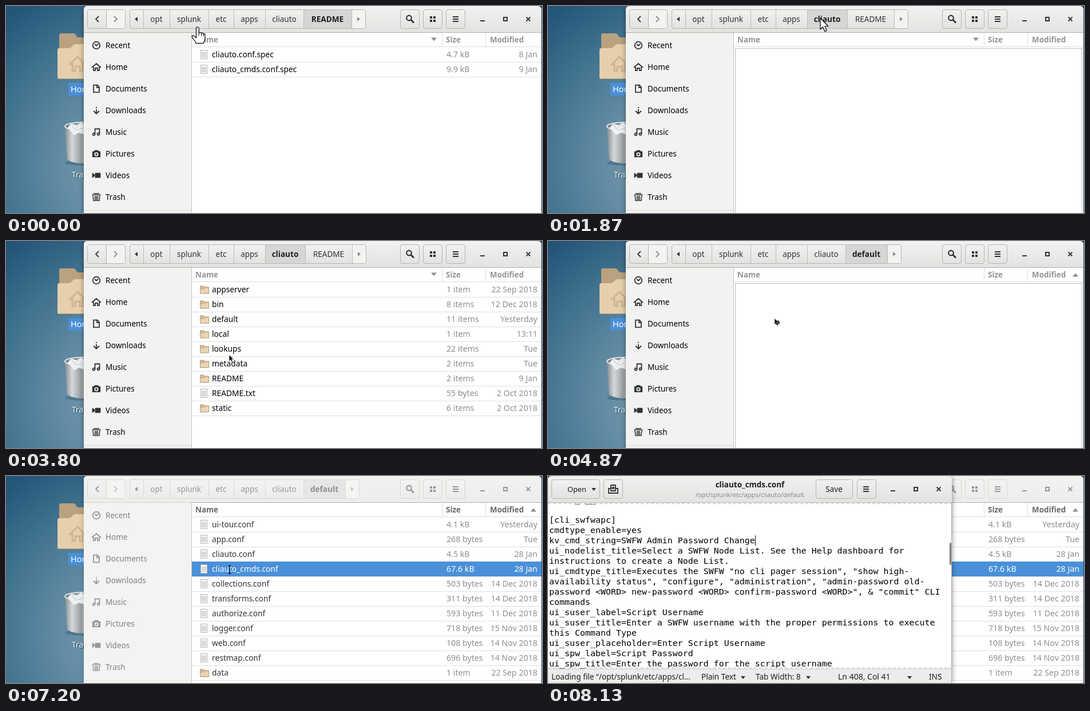
An HTML page that plays this animation: 937x363 px, repeating every 8270 ms.

```html
<!DOCTYPE html>
<html lang="en">
<head>
<meta charset="utf-8">
<title>File browser</title>
<style>
html, body { margin: 0; width: 100%; height: 100%; overflow: hidden; background: #40708f; }
svg { display: block; width: 937px; height: 363px; }
text { font: 13.6px "Noto Sans", "Open Sans", sans-serif; fill: #1c2022; white-space: pre; }
.b { font-weight: bold; }
.mid { text-anchor: middle; }
.end { text-anchor: end; }
.meta { font-size: 14.2px; fill: #8b8e8f; }
.side { font-size: 13.5px; fill: #000; }
.head { font-weight: bold; font-size: 13.4px; fill: #929595; }
.name { fill: inherit; }
.sel, .sel text { fill: #fff; }
.code { font: 14.95px "DejaVu Sans Mono", monospace; fill: #000; }
.ico { fill: none; stroke: #2e3436; stroke-width: 1.8; }
.solid { fill: #2e3436; }
</style>
</head>
<body>
<svg id="stage" viewBox="0 0 937 363" xmlns="http://www.w3.org/2000/svg"></svg>
<script>
const stage = document.getElementById('stage');
const LOOP = 8270;

// ---------- markup helpers ----------
const rect = (x, y, w, h, fill, more = '') =>
  `<rect x="${x}" y="${y}" width="${w}" height="${h}" fill="${fill}" ${more}/>`;
const path = (d, more = '') => `<path d="${d}" ${more}/>`;
const text = (x, y, s, cls = '', more = '') =>
  `<text x="${x}" y="${y}" class="${cls}" ${more}>${s.replace(/&/g, '&amp;').replace(/</g, '&lt;')}</text>`;
const group = (id, body, more = '') => `<g id="${id}" ${more}>${body}</g>`;
const at = (x, y, body, more = '') => `<g transform="translate(${x} ${y})" ${more}>${body}</g>`;
const hline = (x1, x2, y, c) => rect(x1, y, x2 - x1, 1, c);
const vline = (x, y1, y2, c) => rect(x, y1, 1, y2 - y1, c);
const tri = (x, y, dir, r = 4, c = '#2e3436') => {
  const turn = { right: 0, down: 90, left: 180, up: 270 }[dir];
  return path(`M${-r / 2} ${-r}L${r / 2 + 1} 0L${-r / 2} ${r}z`,
    `transform="translate(${x} ${y}) rotate(${turn})" fill="${c}"`);
};
const button = (x, w) =>
  rect(x + .5, 6.5, w, 33, 'url(#btn)', 'rx="3.5" stroke="#b4b4b0"');

// ---------- shared window parts ----------
const burger = x => [-4, 0, 4].map(d => rect(x - 5, 22 + d, 10, 2, '#2e3436')).join('');
const controls = x =>
  rect(x - 4, 25, 8, 2, '#2e3436') +
  rect(x + 37, 20, 6, 6, 'none', 'stroke="#2e3436" stroke-width="2"') +
  path(`M${x + 76.5} 19.5l7 7m0-7l-7 7`, 'class="ico"');
const frame = (x, w) =>
  path(`M${x} 363V7q0-7 7-7H${x + w - 7}q7 0 7 7V363z`, 'fill="#f2f2f1"') +
  path(`M${x} 46V7q0-7 7-7H${x + w - 7}q7 0 7 7V46z`, 'fill="url(#bar)"') +
  hline(x, x + w, 46, '#b0b0ac');

// ---------- desktop ----------
function desktop() {
  const home =
    path('M93 51q0-3 3-3h22q3 0 4 3l3 4h30v60H93z', 'fill="#b9a27f"') +
    path('M90 77q0-3 3-3h17q3 0 5-3l2-2q2-2 5-2h40v61H93q-3 0-3-3z', 'fill="#e6cfac"') +
    hline(91, 160, 127, '#c4aa82') +
    path('M112 102l13-13 13 13h-4v12h-5v-8h-8v8h-5v-12z',
      'fill="none" stroke="#cbb58f" stroke-width="3"');
  const bin =
    '<ellipse cx="134" cy="275" rx="31" ry="5" fill="#24485f" opacity=".35"/>' +
    path('M103 211l4 58q8 7 27 7t27-7l4-58z', 'fill="url(#metal)"') +
    path('M103 211l4 58q8 7 27 7t27-7l4-58z', 'fill="url(#mesh)"') +
    '<ellipse cx="134" cy="211" rx="31" ry="7" fill="#7c8386" stroke="#dfe3e4" stroke-width="2"/>' +
    path('M108 213l6-7 9 3 8-5 10 6 8 6-10 10-12-4-8 5z', 'fill="#edf1f3"') +
    path('M114 207l6 9 10-11m-8 13l13-4', 'stroke="#b9c4ca" fill="none"');
  return rect(0, 0, 937, 363, 'url(#sky)') + home +
    rect(109, 135, 54, 22, '#4a90d9', 'rx="2"') +
    text(113, 151, 'Home', '', 'style="fill:#fff;font-size:14.5px"') + bin +
    text(116, 302, 'Trash', '', 'style="fill:#17384e;font-size:14px"') +
    text(115, 301, 'Trash', '', 'style="fill:#fff;font-size:14px"');
}

// ---------- file browser ----------
function sidebar() {
  const icons = {
    Recent: '<circle r="6.3"/>' + path('M-3-2l3 2.5 3.5-3'),
    Home: path('M-8 1L0-6 8 1M-5 0V6h3V2h4v4h3V0'),
    Documents: path('M-5-6.3H2L5-3V6.3H-5zM1-6V-2H5'),
    Downloads: path('M-5 1L0 6 5 1M0 5V-2M0-4v-2'),
    Music: '<circle cx="-4.5" cy="4" r="2"/><circle cx="3.5" cy="3.5" r="2"/>' + path('M-2.5 4V-5.5h8V3.5'),
    Pictures: path('M-7-4h3l1-2h6l1 2h3V6H-7z', 'class="solid" stroke-width=".3"') +
      '<circle cy="1" r="2.7" style="stroke:#f2f2f1"/>',
    Videos: path('M-2-4H7V4H-2zM-7-4l4 3v2l-4 3z', 'class="solid" stroke-width=".8"'),
    Trash: path('M-7.500-4H7.500M-5-6.300H5M-6-3l1 9.300H5l1-9.300M-2-2q-1 4 0 7M2-2q1 4 0 7M0-2v7', 'stroke-width="1.500"')
  };
  return Object.entries(icons).map(([label, art], i) => {
    const y = 69 + 38 * i;
    return at(158, y, art, 'class="ico"') + text(174, y + 4.5, label, 'side');
  }).join('') + hline(136, 324, 358, '#d5d5d3') + vline(324, 47, 363, '#c3c3c0');
}

function crumbs(id, labels, edges, active) {
  const last = edges[edges.length - 1], end = last + 24;
  let s = rect(216.5, 6.5, end - 216, 33, 'url(#btn)', 'rx="3.5" stroke="#b4b4b0"') +
    rect(last + 1, 7, 23, 32, '#f3f3f2', 'rx="3"') +
    tri(228, 23, 'left') + tri(end - 12, 23, 'right', 4, '#8b8e8f');
  labels.forEach((label, i) => {
    const x = edges[i], w = edges[i + 1] - x, on = i === active;
    if (on) s += rect(x, 7, w, 32, '#d6d6d4');
    s += text(x + w / 2, 28, label, on ? 'mid b' : 'mid', on ? '' : 'style="font-size:13.5px;fill:#2e3436"');
  });
  s += edges.map(x => vline(x, 7, 39, '#bcbcb9')).join('');
  return group(id, s);
}

function toolbar() {
  const base = ['opt', 'splunk', 'etc', 'apps', 'cliauto'];
  const x = [240, 286, 354, 398, 453];
  return button(142, 66) + rect(176, 7, 32, 32, '#f3f3f2', 'rx="3"') + vline(175, 7, 39, '#b4b4b0') +
    path('M162 18l-5 5 5 5', 'class="ico" stroke-width="2"') +
    path('M189 18l5 5-5 5', 'class="ico" style="stroke:#8b8e8f"') +
    crumbs('path0', [...base, 'README'], [...x, 520, 604], 5) +
    crumbs('path1', [...base, 'README'], [...x, 523, 605], 4) +
    crumbs('path2', [...base, 'default'], [...x, 520, 593], 5) +
    button(689, 33) + button(729, 33) + button(769, 33) +
    '<circle cx="704.5" cy="21" r="4.300" class="ico" style="stroke-width:2.200"/>' +
    path('M707.5 24l5.500 5.500', 'class="ico" style="stroke-width:3"') +
    [0, 6].map(a => [0, 6].map(b => rect(741 + a, 18 + b, 4, 4, '#2e3436')).join('')).join('') +
    burger(786) + controls(833);
}

const page = rect(340.5, -7.5, 11, 15, '#fafafa', 'stroke="#b5b5b2"') +
  [-4, -2, 0, 2, 4].map(y => rect(342, y, 8, 1, '#b9b9b6')).join('');
const folder = path('M339.5-6h6l2 2h7V7h-15z', 'fill="#d2ba94" stroke="#b59d77"') +
  path('M340 6V0h6l2-2h6V6z', 'fill="#ead6b5"');

function listing(id, lines, pick) {
  return group(id, lines.trim().split('\n').map((line, i) => {
    const [name, size, date] = line.split('|');
    const y = 85 + 26 * i;
    const row = sel => (sel ? rect(325, y - 13, 611, 26, '#4a90d9') : hline(325, 936, y + 13, '#dfdfdd')) +
      at(0, y, /item/.test(size) ? folder : page) +
      text(360, y + 5, name, 'name', 'style="font-size:13.75px"') +
      text(770, y + 5, size, 'meta') + text(929, y + 5, date, 'meta end');
    return row(false) + (i === pick ? group(id + 'Sel', row(true), 'class="sel"') : '');
  }).join(''));
}

function files() {
  return rect(325, 47, 611, 316, '#fff') +
    group('heads', text(331, 64, 'Name', 'head', 'id="headName"') +
      text(769, 64, 'Size', 'head') + text(846, 64, 'Modified', 'head')) +
    group('sortName', tri(748, 58, 'down', 5, '#8b8e8f')) +
    group('sortDate', tri(922, 60, 'up', 5, '#8b8e8f')) +
    vline(762, 47, 72, '#dcdcda') + vline(838, 47, 72, '#dcdcda') + hline(325, 936, 71, '#dcdcda') +
    group('empty', rect(327.5, 74.5, 606, 300, 'none', 'stroke="#777" stroke-dasharray="1 1"')) +
    listing('list0', `
cliauto.conf.spec|4.7 kB|8 Jan
cliauto_cmds.conf.spec|9.9 kB|9 Jan`) +
    listing('list1', `
appserver|1 item|22 Sep 2018
bin|8 items|12 Dec 2018
default|11 items|Yesterday
local|1 item|13:11
lookups|22 items|Tue
metadata|2 items|Tue
README|2 items|9 Jan
README.txt|55 bytes|2 Oct 2018
static|6 items|2 Oct 2018`, 2) +
    listing('list2', `
ui-tour.conf|4.1 kB|Yesterday
app.conf|268 bytes|Tue
cliauto.conf|4.5 kB|28 Jan
cliauto_cmds.conf|67.6 kB|28 Jan
collections.conf|503 bytes|14 Dec 2018
transforms.conf|311 bytes|14 Dec 2018
authorize.conf|593 bytes|11 Dec 2018
logger.conf|718 bytes|15 Nov 2018
web.conf|108 bytes|14 Nov 2018
restmap.conf|696 bytes|14 Nov 2018
data|1 item|22 Sep 2018`, 3);
}

// ---------- text editor ----------
function editor() {
  const lines = `     _ __

[cli_swfwapc]
cmdtype_enable=yes
kv_cmd_string=SWFW Admin Password Change
ui_nodelist_title=Select a SWFW Node List. See the Help dashboard for
instructions to create a Node List.
ui_cmdtype_title=Executes the SWFW "no cli pager session", "show high-
availability status", "configure", "administration", "admin-password old-
password <WORD> new-password <WORD> confirm-password <WORD>", & "commit" CLI
commands
ui_suser_label=Script Username
ui_suser_title=Enter a SWFW username with the proper permissions to execute
this Command Type
ui_suser_placeholder=Enter Script Username
ui_spw_label=Script Password
ui_spw_title=Enter the password for the script username`.split('\n');
  const dash = y => path(`M0 ${y}H706`, 'stroke="#b8b8b5" stroke-dasharray="5 4"');
  const doc = lines.map((s, i) => text(2, 46 + 18 * i, s, 'code')).join('');
  return rect(0, 2, 706, 361, '#000', 'filter="url(#blur)" opacity=".45"') + frame(0, 706) +
    button(6, 84) + text(34, 28, 'Open', '', 'style="font-size:12.8px"') + tri(80, 23, 'down') +
    button(97, 33) +
    path('M109 22h-3v8h16v-8h-3M110 16h8v10h-8zM114 18v6m-3-3h6', 'class="ico"') +
    text(353, 20, 'cliauto_cmds.conf', 'mid b', 'style="font-size:13.5px"') +
    text(353, 37, '/opt/splunk/etc/apps/cliauto/default', 'mid', 'style="font-size:11.15px;fill:#858889"') +
    button(468, 64) + text(500, 28, 'Save', 'mid') + button(540, 33) + burger(556) + controls(603) +
    rect(0, 47, 706, 291, '#fff') +
    group('doc', doc + dash(48.5) + dash(336.5) +
      rect(702, 117, 3, 39, '#7d8081', 'rx="1.5"'), 'clip-path="url(#page)"') +
    rect(0, 338, 706, 25, '#ececeb') + hline(0, 706, 338, '#c9c9c6') +
    text(6, 357, 'Loading file “/opt/splunk/etc/apps/cl…') +
    text(268, 357, 'Plain Text') + tri(341, 353, 'down') +
    text(363, 357, 'Tab Width: 8') + tri(455, 353, 'down') +
    text(507, 357, 'Ln 408, Col 41', '', 'style="font-size:14px"') + tri(632, 353, 'down') +
    text(666, 357, 'INS') + group('caret', vline(362, 104, 122, '#000')) +
    vline(705, 47, 363, '#b5b5b2');
}

// ---------- pointers ----------
const arrow = path('M0-.5V11l2.6-2.4 1.9 4 1.9-.9-1.9-3.9h3.7z', 'fill="#000" stroke="#fff" stroke-width=".7"');
const white = 'fill="#fff" stroke="#000" stroke-width="1.2" stroke-linejoin="round"';
const pointers =
  group('hand', path('M-2.5 2q0-2 2.3-2T2.2 2v8q3-1.5 4.3.8 3-1 4 1 2.5-.6 2.5 2v6q0 4-3 8.5H-3q-1-4-5-8-3-4-1-5.3 2-1 4 1.3l2.5 2.5z', white) +
    path('M2.2 10v5m4.3-4v4.5m4-3.5v4', 'stroke="#000"')) +
  group('arrow', arrow) +
  group('wait', arrow + '<circle cx="5.5" cy="7" r="2.6" fill="#777" stroke="#000" stroke-width="2" stroke-dasharray="3 1" id="ring"/>') +
  group('big', path('M0 0v20l4.5-4.3 3.5 8 3.2-1.4-3.4-7.8h6z', white)) +
  group('beam', path('M-2-7q2 0 2 1.5V5.5Q0 7-2 7M2-7Q0-7 0-5.5M0 5.5Q0 7 2 7', 'fill="none" stroke="#000" stroke-width="1.3"'));

const stops = (...list) => list.map(([o, c]) => `<stop offset="${o}" stop-color="${c}"/>`).join('');
const fade = (id, a, b) => `<linearGradient id="${id}" x2="0" y2="1">${stops([0, a], [1, b])}</linearGradient>`;

stage.innerHTML = `<defs>
  <radialGradient id="sky" gradientUnits="userSpaceOnUse" cx="230" cy="280" r="370">
    ${stops([0, '#7b9dae'], [.35, '#648da5'], [.65, '#42738f'], [1, '#1e4f75'])}</radialGradient>
  ${fade('bar', '#f1f1f0', '#e3e3e1')}${fade('btn', '#f1f1f0', '#e2e2e0')}
  <linearGradient id="metal">${stops([0, '#8b9194'], [.2, '#e4e7e8'], [.45, '#a3a9ab'], [.7, '#e2e5e6'], [1, '#6d7376'])}</linearGradient>
  <pattern id="mesh" width="4" height="4" patternUnits="userSpaceOnUse">${path('M0 0l4 4M4 0L0 4', 'stroke="#4f5558" stroke-width=".6" opacity=".35"')}</pattern>
  <filter id="blur" x="-10%" y="-20%" width="120%" height="140%"><feGaussianBlur stdDeviation="5"/></filter>
  <clipPath id="page"><rect y="47" width="706" height="291"/></clipPath></defs>` +
  desktop() + group('shade', rect(136, 3, 800, 365, '#000', 'filter="url(#blur)"')) +
  frame(136, 800) + toolbar() + sidebar() +
  group('dim', path('M136 363V7q0-7 7-7H929q7 0 7 7V46H324V363z', 'fill="#f5f5f4"')) +
  group('files', files()) + group('editor', editor()) + group('pointer', pointers);

// ---------- motion ----------
const el = {};
stage.querySelectorAll('[id]').forEach(n => el[n.id] = n);
const show = (id, on) => el[id].setAttribute('display', on ? 'inline' : 'none');
const ramp = (t, a, b) => Math.min(1, Math.max(0, (t - a) / (b - a)));
const ease = p => p * p * (3 - 2 * p);

// time, x, y
const route = [
  [0, 335, 37], [470, 480, 18], [600, 467, 12], [1070, 467, 12], [1130, 470, 14], [1200, 470, 14],
  [1400, 476, 21], [2270, 476, 21], [2730, 390, 216], [2800, 390, 217], [3200, 390, 233],
  [3330, 390, 233], [3800, 390, 200], [4130, 399, 162], [4270, 399, 162], [4600, 396, 136],
  [5270, 396, 136], [5600, 394, 168], [6940, 394, 168], [7000, 391, 164], [LOOP, 391, 164]
];

function spot(t) {
  const i = Math.max(1, route.findIndex(k => k[0] >= t));
  const [a, x, y] = route[i - 1], [b, u, v] = route[i];
  const p = ease(ramp(t, a, b));
  return [x + (u - x) * p, y + (v - y) * p];
}

function shape(t) {
  if (t < 70) return 'hand';
  if (t >= 7000) return t < 7400 ? 'beam' : '';
  if (t >= 1270 && t < 2330) return 'big';
  if ((t >= 4800 && t < 5000) || t >= 6200) return 'wait';
  return 'arrow';
}

function draw(t) {
  const view = t < 1800 ? 0 : t < 4800 ? 1 : 2;
  const empty = (t >= 1800 && t < 2000) || (t >= 4800 && t < 5000);
  for (let i = 0; i < 3; i++) {
    show('path' + i, i === view);
    show('list' + i, i === view && !empty);
  }
  show('empty', empty);
  show('sortName', view < 2);
  show('sortDate', view === 2);
  show('list1Sel', t >= 4600);
  show('list2Sel', t >= 6000);

  const [x, y] = spot(t), kind = shape(t);
  el.pointer.setAttribute('transform', `translate(${Math.round(x)} ${Math.round(y)})`);
  ['hand', 'arrow', 'wait', 'big', 'beam'].forEach(k => show(k, k === kind));
  el.ring.setAttribute('stroke-dashoffset', t / 67 % 4);

  const back = ramp(t, 6730, 6930);
  el.dim.setAttribute('opacity', .52 * back);
  el.shade.setAttribute('opacity', .4 - .2 * back);
  el.files.setAttribute('fill', back > .5 ? '#2e3436' : '#000');
  el.headName.style.fill = t > 2270 && t < 2730 && y > 46 && y < 72 ? '#2e3436' : '';
  el.heads.style.filter = back > .5 ? 'brightness(.7)' : '';

  const grow = ease(ramp(t, 7200, 7470)), s = .8 + .2 * grow;
  show('editor', grow > 0);
  el.editor.setAttribute('opacity', grow);
  el.editor.setAttribute('transform', `translate(${353 * (1 - s)} ${181 * (1 - s)}) scale(${s})`);
  show('doc', t >= 7600);
  show('caret', t >= 8130);
}

const start = performance.now();
function tick() {
  const step = Math.floor(((performance.now() - start) % LOOP + 4) * 15 / 1000);
  draw(Math.min(LOOP - 1, Math.round(step * 100 / 15) * 10));
  requestAnimationFrame(tick);
}
draw(0);
requestAnimationFrame(tick);
</script>
</body>
</html>
```
